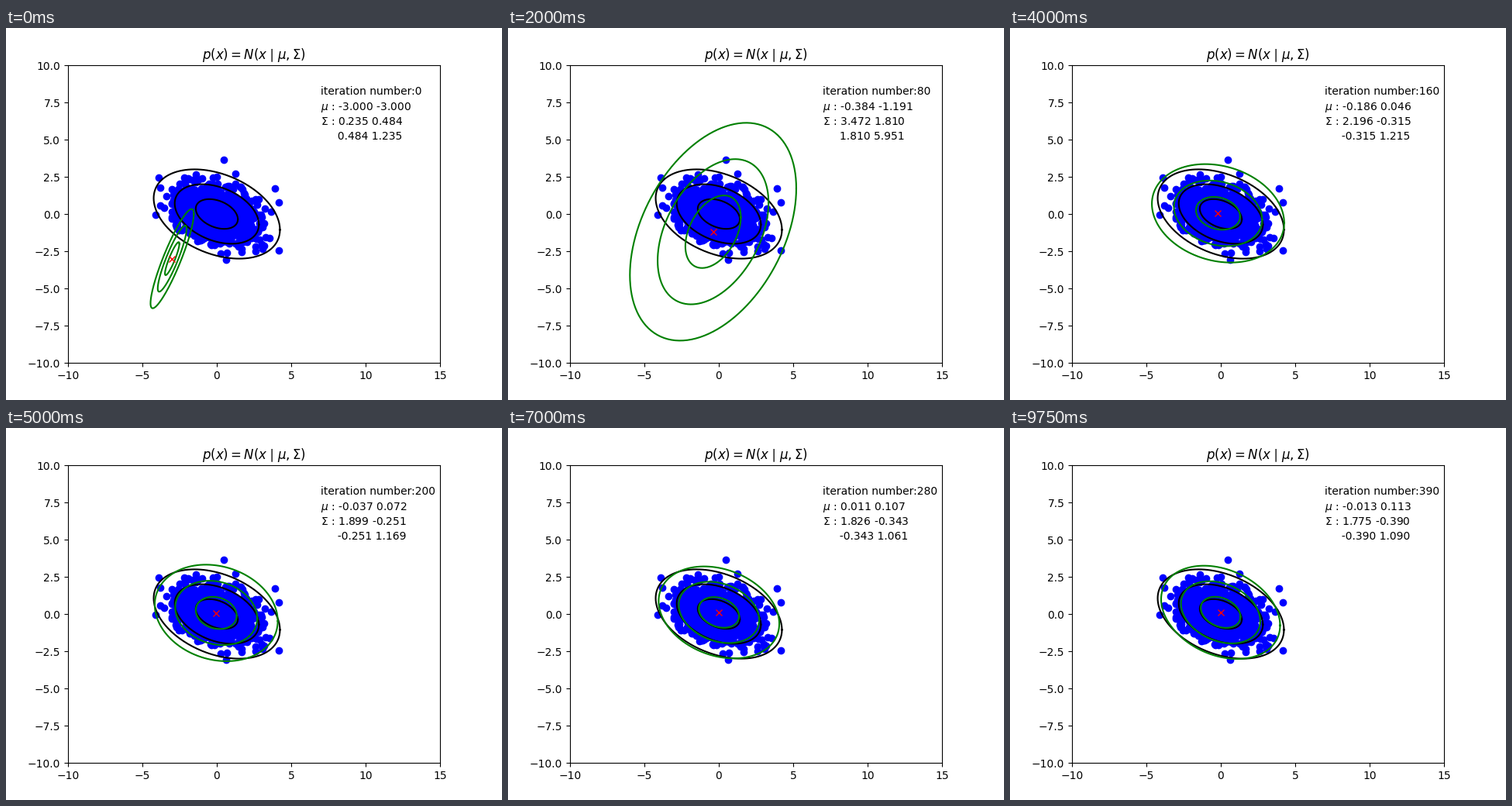
Write a matplotlib script that moves like this. It is 640 px wide and 480 px high and loops after 10000 ms.

```python
import numpy as np
import matplotlib.pyplot as plt
from matplotlib.animation import FuncAnimation

FRAMES = 40
STEP = 10  # iterations per frame

TRUE_MEAN = np.zeros(2)
TRUE_COV = np.array([[2.0, -0.5], [-0.5, 1.0]])

# Key states of the fit: iteration -> mean x, mean y, var x, cov xy, var y
STATES = {
    0: (-3.000, -3.000, 0.235, 0.484, 1.235),
    40: (-1.420, -1.855, 8.072, 3.281, 12.116),
    80: (-0.384, -1.191, 3.472, 1.810, 5.951),
    160: (-0.186, 0.046, 2.196, -0.315, 1.215),
    240: (0.012, 0.080, 1.800, -0.230, 1.153),
    320: (0.011, 0.116, 1.835, -0.380, 1.030),
    390: (-0.013, 0.113, 1.775, -0.390, 1.090),
}

OUTLIERS = [(0.45, 3.65), (-3.9, 2.45), (3.92, 1.72), (4.17, 0.8),
            (4.17, -2.45), (-4.1, -0.05), (0.65, -3.07), (1.25, 2.72)]

ANGLE = np.linspace(0, 2 * np.pi, 241)
CIRCLE = np.array([np.cos(ANGLE), np.sin(ANGLE)])


def cloud():
    rng = np.random.default_rng(4)
    pts = rng.multivariate_normal(TRUE_MEAN, TRUE_COV, 1000)
    dist2 = np.einsum("ni,ij,nj->n", pts, np.linalg.inv(TRUE_COV), pts)
    return np.vstack([pts[dist2 < 8], OUTLIERS])


def ellipse(mean, cov, radius):
    return mean[:, None] + radius * np.linalg.cholesky(cov) @ CIRCLE


def ease_out(u):
    return 1 - (1 - u) ** 2


def fit_at(iteration):
    """Mean and covariance, settling quickly towards each key state."""
    keys = list(STATES)
    i = min(np.searchsorted(keys, iteration, side="right"), len(keys) - 1)
    start, end = keys[i - 1], keys[i]
    a, b = np.array(STATES[start]), np.array(STATES[end])
    mx, my, vx, cxy, vy = a + (b - a) * ease_out(
        (iteration - start) / (end - start))
    return np.array([mx, my]), np.array([[vx, cxy], [cxy, vy]])


fig = plt.figure(figsize=(6.4, 4.8), dpi=100)
ax = fig.add_axes([0.125, 0.1, 0.75, 0.8])
ax.set_xlim(-10, 15)
ax.set_ylim(-10, 10)
ax.set_title(r"$p(x) = N(x \mid \mu, \Sigma)$")

ax.plot(*cloud().T, "bo")
for r in (1, 2, 3):
    ax.plot(*ellipse(TRUE_MEAN, TRUE_COV, r), color="black")
rings = [ax.plot([], [], color="green")[0] for _ in range(3)]
center, = ax.plot([], [], "rx")
labels = [ax.text(7, y, "") for y in (8, 7, 6, 5)]


def update(frame):
    iteration = frame * STEP
    mean, cov = fit_at(iteration)
    for r, ring in enumerate(rings, 1):
        ring.set_data(*ellipse(mean, cov, r))
    center.set_data([mean[0]], [mean[1]])
    lines = (
        f"iteration number:{iteration}",
        rf"$\mu$ : {mean[0]:.3f} {mean[1]:.3f}",
        rf"$\Sigma$ : {cov[0, 0]:.3f} {cov[0, 1]:.3f}",
        f"     {cov[1, 0]:.3f} {cov[1, 1]:.3f}",
    )
    for label, line in zip(labels, lines):
        label.set_text(line)
    return [*rings, center, *labels]


anim = FuncAnimation(fig, update, frames=FRAMES, interval=250,
                     repeat=True, repeat_delay=0)
plt.show()
```
